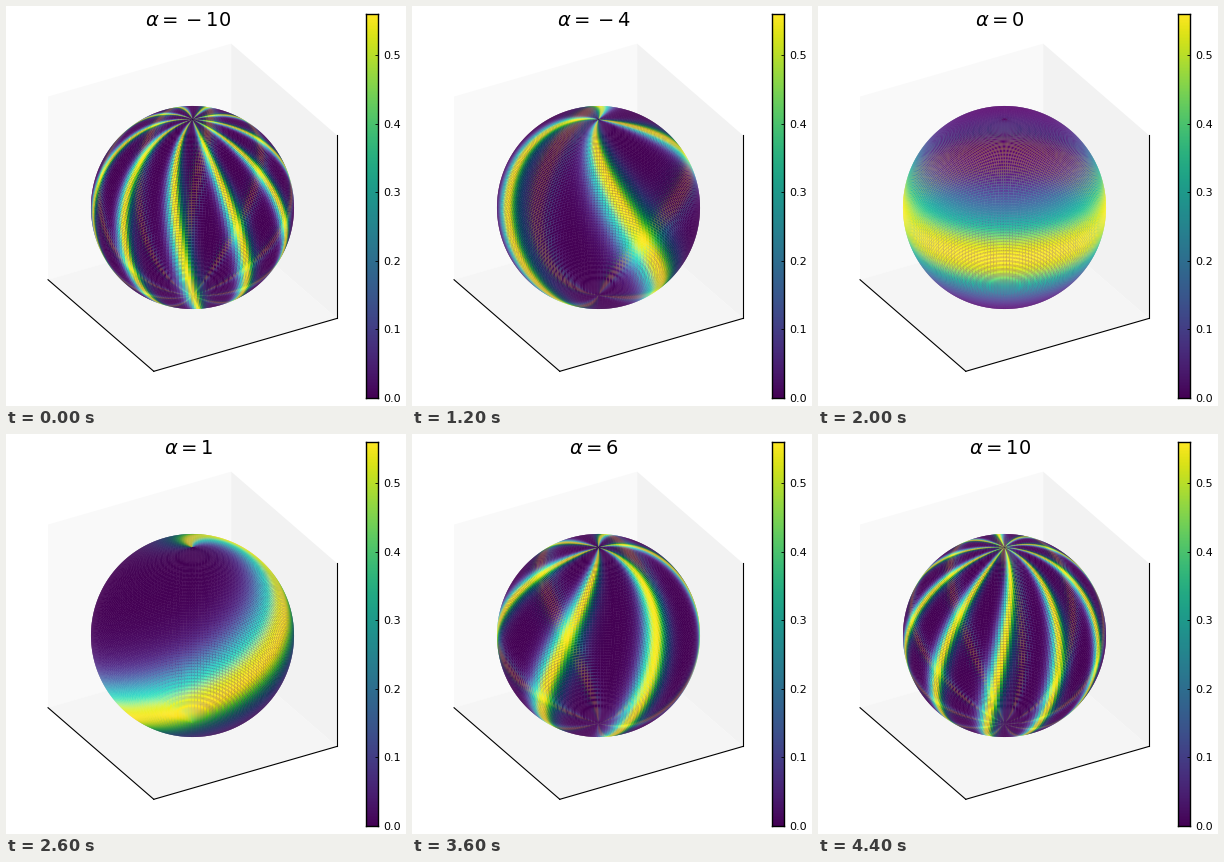
These frames come from a looping animation (400 px wide and 400 px high, 4.6 s). A matplotlib script:

```python
import numpy as np
import matplotlib.pyplot as plt
from matplotlib.animation import FuncAnimation
from matplotlib.collections import PolyCollection
from matplotlib.colors import LightSource

plt.rcParams["font.family"] = "DejaVu Sans"

SIZE, DPI = 400, 100
CENTER = np.array([186.5, 201.5])
BOX = 211.5                      # side of the axes cube in pixels
RADIUS = BOX / 2 / (1 + 1 / 24)  # unit sphere with the usual axis margin
AZIM, ELEV = np.radians(-30), np.radians(30)
GRID = 200
KAPPA = 2.3
PEAK = 0.56
ALPHAS = [*range(-10, 0), 0, 0, 0, *range(1, 11)]


def project(x, y, z, scale):
    """Orthographic view: pixel positions and depth towards the viewer."""
    ca, sa, ce, se = np.cos(AZIM), np.sin(AZIM), np.cos(ELEV), np.sin(ELEV)
    forward = ca * x + sa * y
    right = -sa * x + ca * y
    up = ce * z - se * forward
    depth = ce * forward + se * z
    pos = np.stack([CENTER[0] + scale * right, CENTER[1] - scale * up], axis=-1)
    return pos, depth


def corner(x, y, z):
    return project(x, y, z, BOX / 2)[0]


def cells(grid):
    """Four corners of every cell of a 2D grid of points."""
    quads = [grid[:-1, :-1], grid[:-1, 1:], grid[1:, 1:], grid[1:, :-1]]
    return np.stack(quads, axis=2).reshape(-1, 4, *grid.shape[2:])


phi, theta = np.meshgrid(np.linspace(0, 2 * np.pi, GRID),
                         np.linspace(0, np.pi, GRID))
points, depth = project(np.sin(theta) * np.cos(phi),
                        np.sin(theta) * np.sin(phi),
                        np.cos(theta), RADIUS)
order = np.argsort(cells(depth).mean(axis=1))
light = LightSource(270, 45)


def density(alpha):
    """Von Mises density wound alpha times around the sphere."""
    angle = alpha * phi + 2 * theta - np.pi
    return np.exp(KAPPA * np.cos(angle)) / (2 * np.pi * np.i0(KAPPA))


def face_colors(alpha):
    rgba = light.shade(density(alpha), plt.cm.viridis,
                       vert_exag=0.1, blend_mode="soft")
    return rgba[:-1, :-1].reshape(-1, rgba.shape[-1])[order]


def title_text(alpha):
    sign = r"\hspace{0.2}{-}\hspace{0.2}" if alpha < 0 else ""
    return rf"$\alpha = {sign}{abs(alpha)}$"


fig = plt.figure(figsize=(SIZE / DPI, SIZE / DPI), dpi=DPI, facecolor="white")
ax = fig.add_axes([0, 0, 1, 1])
ax.set(xlim=(0, SIZE), ylim=(SIZE, 0))
ax.axis("off")

# Walls, floor and the three axis lines
panes = [
    ([(-1, -1, -1), (-1, 1, -1), (-1, 1, 1), (-1, -1, 1)], 0.975),
    ([(-1, 1, -1), (1, 1, -1), (1, 1, 1), (-1, 1, 1)], 0.95),
    ([(-1, -1, -1), (1, -1, -1), (1, 1, -1), (-1, 1, -1)], 0.9625),
]
for corners, gray in panes:
    ax.fill(*np.transpose([corner(*c) for c in corners]),
            facecolor=str(gray), linewidth=0)
edges = [(-1, -1, -1), (1, -1, -1), (1, 1, -1), (1, 1, 1)]
for start, end in zip(edges, edges[1:]):
    ax.plot(*np.transpose([corner(*start), corner(*end)]),
            color="black", linewidth=0.8)

sphere = PolyCollection(cells(points)[order], edgecolors="none",
                        linewidths=0, antialiaseds=True)
ax.add_collection(sphere, autolim=False)
title = ax.text(182.3, 20, "", fontsize=14, ha="center", va="baseline")

# Color bar
bar = fig.add_axes([360 / SIZE, 8 / SIZE, 12 / SIZE, 384 / SIZE])
bar.imshow(np.linspace(0, 1, 256)[:, None], cmap="viridis", origin="lower",
           extent=(0, 1, 0, PEAK), aspect="auto", interpolation="nearest")
bar.set_xticks([])
bar.set_yticks(np.arange(6) / 10)
bar.yaxis.tick_right()
bar.tick_params(axis="y", direction="in", length=2.2, width=0.6,
                pad=3.5, labelsize=8)
for spine in bar.spines.values():
    spine.set_linewidth(1)


def update(frame):
    alpha = ALPHAS[frame]
    sphere.set_facecolor(face_colors(alpha))
    title.set_text(title_text(alpha))
    return sphere, title


anim = FuncAnimation(fig, update, frames=len(ALPHAS), interval=200,
                     repeat=True, repeat_delay=0, blit=False)
plt.show()
```
